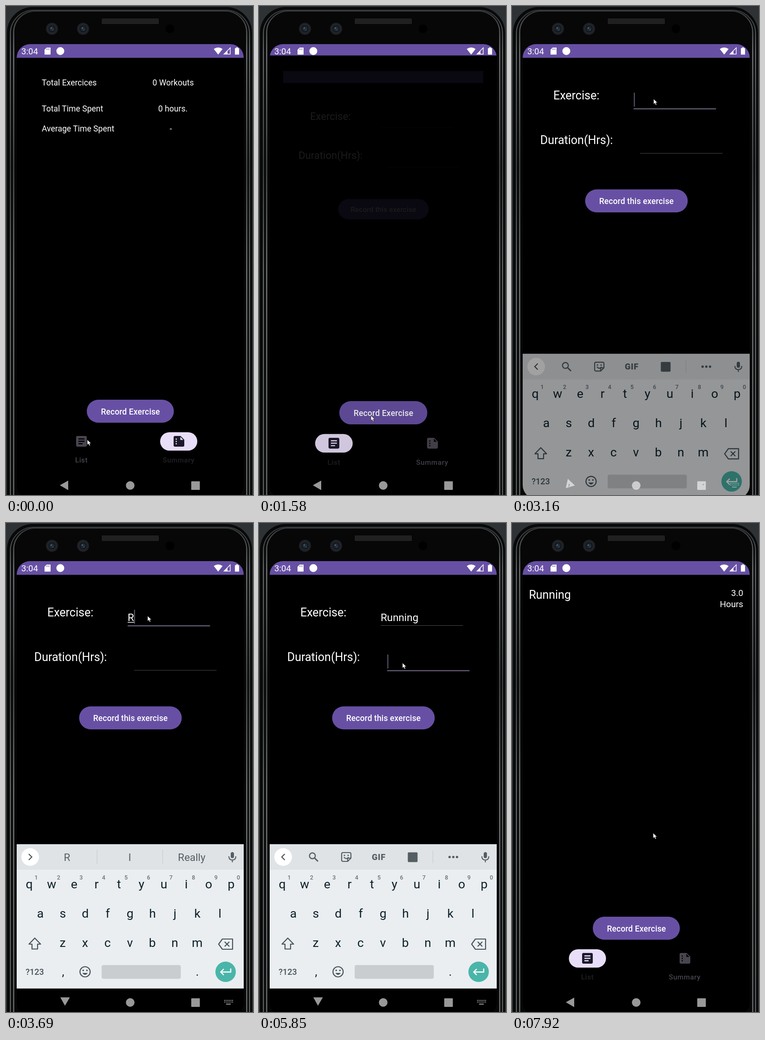
Write an HTML page that moves like this. It is 532 by 1052 pixels and loops after 8000 ms.

```html
<!DOCTYPE html>
<html lang="en">
<head>
<meta charset="utf-8">
<title>Exercise log</title>
<style>
html, body { margin: 0; width: 100%; height: 100%; overflow: hidden; background: #000; }
svg { display: block; width: 532px; height: 1052px; font-family: Roboto, "Noto Sans", sans-serif; }
text { white-space: pre; }
</style>
</head>
<body>
<script>
const LOOP = 8000;
// Moments at which the picture may change
const CUTS = [0, 150, 300, 440, 580, 730, 880,
  1160, 1300, 1450, 1580, 1710, 1860, 2010, 2160,
  2440, 2580, 2720, 2870, 3010, 3160, 3290, 3570, 3690,
  3990, 4120, 4270, 4400, 4540, 5120, 5270, 5410, 5560, 5700, 5850,
  6150, 6300, 6580, 6730, 6880, 7020, 7180, 7340, 7470, 7620, 7770, 7920];
const POINTER = [[0, 175, 933], [300, 175, 933], [880, 241, 881], [2300, 241, 881],
  [2870, 305, 200], [5000, 305, 200], [5560, 309, 301], [6450, 309, 301],
  [7180, 280, 415], [7400, 280, 415], [7770, 304, 667]];
const TYPED = [[0, ""], [3690, "R", "R,I,Really"], [3990, "Ru", "Ru,Run,Rub"],
  [4120, "Run", "Run,Running,Runs"], [4270, "Runn", "Runn,Running,Runner"],
  [4400, "Runni", "Runni,Running,Runnings"], [4540, "Running", "Running,running,Runnings"]];

// Markup helpers
const text = (x, y, size, s, more = "") => `<text x="${x}" y="${y}" font-size="${size}" ${more}>${s}</text>`;
const rect = (x, y, w, h, fill, r = 0, more = "") =>
  `<rect x="${x}" y="${y}" width="${w}" height="${h}" rx="${r}" fill="${fill}" ${more}/>`;
const disc = (x, y, r, fill, more = "") => `<circle cx="${x}" cy="${y}" r="${r}" fill="${fill}" ${more}/>`;
const path = (d, more = "") => `<path d="${d}" ${more}/>`;
const group = (id, body, more = "") => `<g id="${id}" ${more}>${body}</g>`;
const mid = 'text-anchor="middle"';
const stroke = (c, w) => `fill="none" stroke="${c}" stroke-width="${w}"`;

const PURPLE = "#6750a4", INK = "#555e63";
const windowBase = rect(23, 82, 489, 978, "#000") + rect(23, 82, 489, 29.5, PURPLE);
const button = (id, x, y, w, label) => rect(x, y, w, 49.5, PURPLE, 24.75) +
  rect(x, y, w, 49.5, "#fff", 24.75, `id="${id}" opacity="0"`) +
  text(268, y + 31.5, 17.5, label, `${mid} font-weight="500" letter-spacing=".1" fill="#fff"`);

function phone() {
  const shell = (x, y, w, r, width) =>
    `<rect x="${x}" y="${y}" width="${w}" height="1120" rx="${r}" ${stroke("url(#metal)", width)}/>`;
  const lens = x => disc(x, 49, 13, "#1d2024") + disc(x, 49, 9, "#15191e", 'stroke="#2c333a"') +
    disc(x, 49, 5, "#202b36") + disc(x - 1.5, 47.5, 1.6, "#56656f") + disc(x + 2, 51.5, 1.2, "#3e4d5c");
  return rect(0, 0, 532, 1052, "#2f3235") +
    `<rect x="2" y="2" width="528" height="1130" rx="56" fill="#080909"/>` +
    shell(9.5, 9, 515, 50, 2) + shell(16.5, 11, 502, 46, 2.4) +
    rect(18, 12, 499, 1110, "#070707", 45) +
    rect(206, 27, 123, 12, "#161616", 2) + rect(206, 27, 123, 12, "url(#mesh)", 2) +
    lens(99) + lens(166) + disc(353, 49, 9.5, "#000");
}

const listIcon = "M154 925H171Q174 925 174 928V945Q174 948 171 948H154Q151 948 151 945V928Q151 925 154 925Z" +
  "M156 930V932.4H169V930ZM156 935.3V937.7H169V935.3ZM156 940.6V943H165V940.6Z";
const pageIcon = "M364 925H376L384 933V945Q384 948 381 948H364Q361 948 361 945V928Q361 925 364 925Z" +
  "M375.5 927V933.5H382ZM365.5 930.5V933H368V930.5ZM365.5 935.5V938H368V935.5ZM365.5 940.5V943H368V940.5Z";

function home() {
  const row = (y, label, x, value) => text(77, y, 17.6, label) + text(x, y, 17.6, value, mid);
  const tab = (name, x, icon, label) =>
    rect(x - 40, 917, 80, 39.5, "#e8def8", 19.75, `id="${name}Pill"`) +
    path(icon, `id="${name}Icon" fill-rule="evenodd"`) +
    text(x, 982, 15, label, `id="${name}Label" ${mid} letter-spacing=".6"`);
  return windowBase +
    group("totals", row(171, "Total Exercices", 360, "0 Workouts") +
      row(227, "Total Time Spent", 359.5, "0 hours.") + row(270, "Average Time Spent", 355, "-"), 'fill="#fff"') +
    group("item", text(36.5, 163, 24.9, "Running") + text(498, 157, 18.7, "3.0", 'text-anchor="end"') +
      text(498, 181, 18.7, "Hours", 'text-anchor="end"'), 'fill="#fff"') +
    button("homeTap", 174, 847, 187.5, "Record Exercise") +
    tab("list", 162.5, listIcon, "List") + tab("sum", 372, pageIcon, "Summary");
}

function form() {
  const field = (n, x, y) => rect(x, y + 9, 177.5, 1, "#4a4a4c", 0, `id="line${n}"`) +
    text(x, y, 22.4, "", `id="value${n}" fill="#fff"`) +
    rect(x, y - 24.5, 2, 30, "#625b71", 0, `id="caret${n}"`);
  return windowBase + text(89, 201, 25, "Exercise:", 'fill="#fff"') +
    text(60.8, 297, 25, "Duration(Hrs):", 'fill="#fff"') +
    field(1, 262, 211) + field(2, 276, 307.5) +
    rect(262, 213, 0, 1.4, "#fff", 0, 'id="compose"') +
    button("formTap", 157.5, 394.5, 221, "Record this exercise");
}

function keyboard() {
  const keys = (s, x, y) => [...s].map((c, i) =>
    text(x + i * 48.33, y, 26.5, c, `class="key" ${mid} fill="#0d2029"`)).join("");
  const digits = [..."1234567890"].map((c, i) =>
    text(65 + i * 48.4, 767, 12.5, c, `${mid} font-weight="500" fill="#687276"`)).join("");
  const tools = `<circle cx="115" cy="716" r="6.3" ${stroke(INK, 2.4)}/>` +
    path("M119.5 720.5L127 728", stroke(INK, 2.8)) +
    path("M181 709H195Q198 709 198 712V721L191 728H181Q178 728 178 725V712Q178 709 181 709ZM198 721H191V728M183 719Q188 725 193 719", stroke(INK, 2.2)) +
    disc(184, 715, 1.6, INK) + disc(192, 715, 1.6, INK) +
    text(258, 724.5, 18, "GIF", `${mid} font-weight="800" letter-spacing=".8" fill="${INK}"`) +
    rect(320.5, 708.5, 21, 21, INK, 2) + rect(374, 705, 1, 27, "#c3c9cc") +
    [410.5, 418.5, 426.5].map(x => disc(x, 718.5, 2.6, INK)).join("");
  const words = rect(195.5, 703, 1, 31, "#c3c9cc") + rect(337, 703, 1, 31, "#c3c9cc") +
    [131.5, 266.5, 400].map(x => text(x, 727, 22.4, "", `class="word" ${mid} fill="${INK}"`)).join("");
  return rect(23, 691, 489, 310.5, "#eaeef1") + rect(23, 691, 489, 55, "#dfe3e6") +
    disc(52, 718.5, 19, "#fff") + path("", `id="chevron" ${stroke("#4a5459", 2.2)}`) +
    group("tools", tools) + group("words", words) +
    rect(484, 708, 7, 13, INK, 3.5) + path("M480 717Q480 725 487.5 725T495 717M487.5 725V730", stroke(INK, 2.1)) +
    digits + keys("qwertyuiop", 50, 786) + keys("asdfghjkl", 74, 849) + keys("zxcvbnm", 122, 912) +
    path("M62 893L74.5 906H68V916.5H56V906H49.5Z", `id="shift" ${stroke("#46535a", 2.2)} stroke-linejoin="round"`) +
    path("M466 895H488V917H466L458 906ZM471 901L481 911M481 901L471 911", `${stroke("#46535a", 2.2)} stroke-linejoin="round"`) +
    text(62, 972, 18, "?123", `${mid} font-weight="500" fill="#46535a"`) +
    text(123, 974, 25, ",", `${mid} fill="#0d2029"`) + text(412, 974, 25, ".", `${mid} fill="#0d2029"`) +
    `<circle cx="170.3" cy="965.5" r="11" ${stroke("#46535a", 2.2)}/>` +
    disc(166.3, 962.5, 1.7, "#46535a") + disc(174.3, 962.5, 1.7, "#46535a") +
    path("M164.5 968Q170.3 976 176 968Z", 'fill="#46535a"') +
    rect(206, 951, 170.5, 29.5, "#c9cdd0", 4) + disc(473, 965.5, 22, "#4ab5a9") +
    path("M484 958.5V966H463M469 959.5L462.5 966L469 972.5", stroke("#fff", 2.4));
}

function systemBars() {
  const dots = [0, 1, 2, 3, 4, 5].flatMap(i => [0, 1].map(j => rect(470 + i * 3.4, 1026 + j * 3.6, 2, 2, "#fff"))).join("");
  return group("status", text(33, 103.5, 18.6, "3:04") +
      path("M87.5 89.5H96V104.5H83V94Z") + path("M87.5 91.5V94.5M90.3 91.5V94.5M93 91.5V94.5", stroke(PURPLE, 1.1)) +
      disc(117, 97, 8.5, "#fff") +
      path("M457 104.5L447.5 92.5Q457 86 466.5 92.5Z") +
      path("M483 90V103.5H469.5Z", stroke("#fff", 1.4)) + path("M477 96V103.5H469.5Z") +
      path("M495.5 89H499.5V90.7H502V104.5H493V90.7H495.5Z"), 'fill="#fff"') +
    group("nav", path("M116 1031L134 1021V1041.5Z", 'id="back"') + `<circle cx="267.5" cy="1031.5" r="9.3"/>` +
      rect(399, 1022.5, 18.5, 18.5, "#fff", 1) +
      group("switcher", dots + rect(474, 1034, 10, 2, "#fff")), 'fill="#fff" opacity=".6"');
}

document.body.innerHTML = `<svg viewBox="0 0 532 1052"><defs>
<clipPath id="glass"><rect x="23" y="82" width="489" height="978" rx="29"/></clipPath>
<linearGradient id="metal" x1="0" y1="0" x2="0" y2="1"><stop offset="0" stop-color="#35383a"/>
<stop offset=".08" stop-color="#76797b"/><stop offset=".3" stop-color="#4b4d4e"/>
<stop offset=".5" stop-color="#77797a"/><stop offset="1" stop-color="#6a6c6d"/></linearGradient>
<pattern id="mesh" width="3" height="3" patternUnits="userSpaceOnUse">${rect(0, 0, 1.6, 1.6, "#3a3a3a")}</pattern>
</defs>${phone()}<g clip-path="url(#glass)">${rect(23, 82, 489, 978, "#000")}${
  group("home", home())}${group("form", form())}${group("keys", keyboard())}${systemBars()}</g>${
  path("M0 0V11.2L2.6 8.8L4.5 13L6.5 12.1L4.7 8.1H8.3Z", 'id="pointer" fill="#fff" stroke="#111" stroke-width=".7"')}</svg>`;

const $ = Object.fromEntries([...document.querySelectorAll("[id]")].map(e => [e.id, e]));
const keyCaps = [...document.querySelectorAll(".key")];
const wordSlots = [...document.querySelectorAll(".word")];
const set = (e, o) => { for (const k in o) e.setAttribute(k, o[k]); };
const show = (e, on) => set(e, { visibility: on ? "inherit" : "hidden" });
const ramp = (t, a, b) => Math.min(1, Math.max(0, (t - a) / (b - a)));
const last = (table, t) => table.filter(r => r[0] <= t).pop();
const zoom = s => `translate(267.5 571) scale(${s}) translate(-267.5 -571)`;

function movePointer(t) {
  const i = POINTER.findLastIndex(p => p[0] <= t), a = POINTER[i], b = POINTER[i + 1] || a;
  const u = a === b ? 0 : ramp(t, a[0], b[0]), k = u * u * (3 - 2 * u);
  set($.pointer, { transform: `translate(${a[1] + (b[1] - a[1]) * k} ${a[2] + (b[2] - a[2]) * k})` });
}

function drawTab(name, on) {
  set($[name + "Pill"], { opacity: on, transform: `translate(${name === "list" ? 162.5 : 372} 0) scale(${.4 + .6 * on} 1) translate(${name === "list" ? -162.5 : -372} 0)` });
  set($[name + "Icon"], { fill: on > .5 ? "#1d192b" : "#49454f" });
  set($[name + "Label"], { fill: on > .5 ? "#1d1b20" : "#49454f", "font-weight": on > .5 ? 700 : 500 });
}

function drawHome(t) {
  const swap = ramp(t, 80, 440), closing = t >= 7470;
  drawTab("list", swap);
  drawTab("sum", 1 - swap);
  set($.totals, { opacity: 1 - ramp(t, 100, 400) });
  show($.item, t >= 7620);
  set($.homeTap, { opacity: t < 1160 || t >= 1580 ? 0 : .28 * ramp(t, 1020, 1300) });
  const s = closing ? .0175 * Math.exp((7470 - t) / 70) : t >= 1580 ? .011 : 0;
  set($.home, { transform: zoom(s < .0001 ? 1 : 1 + s) });
}

function drawField(n, value, focus, caretOn) {
  const text = $["value" + n], line = $["line" + n], x = n === 1 ? 262 : 276;
  if (text.textContent !== value) text.textContent = value;
  const w = value ? text.getComputedTextLength() : 0;
  set(line, { height: focus ? 2.4 : 1, fill: focus ? "#625b71" : "#4a4a4c" });
  set($["caret" + n], { x: x + w + (value ? 0 : .5) });
  show($["caret" + n], focus && caretOn);
  return w;
}

function drawForm(t) {
  show($.form, t >= 1580 && t < 7620);
  const closing = t >= 7470;
  set($.form, {
    opacity: closing ? .2 : Math.min(1, .1 + ramp(t, 1580, 1710)),
    transform: zoom(closing ? .93 : t < 2160 ? 1 - .118 * Math.exp((1580 - t) / 85) : 1)
  });
  const first = t >= 2870 && t < 5560, second = t >= 5560;
  const w = drawField(1, last(TYPED, t)[1], first, true);
  drawField(2, t >= 6300 ? "3" : "", second, t < 6150 || t >= 6300);
  set($.compose, { width: first ? w : 0 });
  set($.formTap, { opacity: t >= 7340 && t < 7620 ? .28 : 0 });
}

function drawKeyboard(t) {
  const u = t >= 7470 ? 0 : ramp(t, 3010, 3290);
  const rise = 1 - (1 - u) ** 2.2, alpha = Math.min(1, u * 1.18);
  show($.keys, u > 0);
  set($.keys, { opacity: alpha, transform: `translate(0 ${310 * (1 - rise)})` });
  const caps = t >= 3570 && t < 3690, hints = t >= 3690 && t < 5560;
  keyCaps.forEach(k => { k.textContent = caps ? k.textContent.toUpperCase() : k.textContent.toLowerCase(); });
  set($.shift, { fill: caps ? "#46535a" : "none" });
  show($.tools, !hints);
  show($.words, hints);
  if (hints) last(TYPED, t)[2].split(",").forEach((s, i) => { wordSlots[i].textContent = s; });
  set($.chevron, { d: hints ? "M49 712L55.5 718.5L49 725" : "M55.5 712L49 718.5L55.5 725" });
  set($.back, { transform: `translate(${1.5 * u} ${-2 * rise}) rotate(${270 * Math.min(1, u * 1.33)} 125.5 1031)` });
  set($.switcher, { opacity: alpha });
}

function frame(now) {
  const time = now % LOOP, t = CUTS.findLast(c => c <= time);
  drawHome(t);
  drawForm(t);
  drawKeyboard(t);
  movePointer(t);
}

const start = performance.now();
function tick() {
  frame(performance.now() - start);
  requestAnimationFrame(tick);
}
tick();
</script>
</body>
</html>
```
